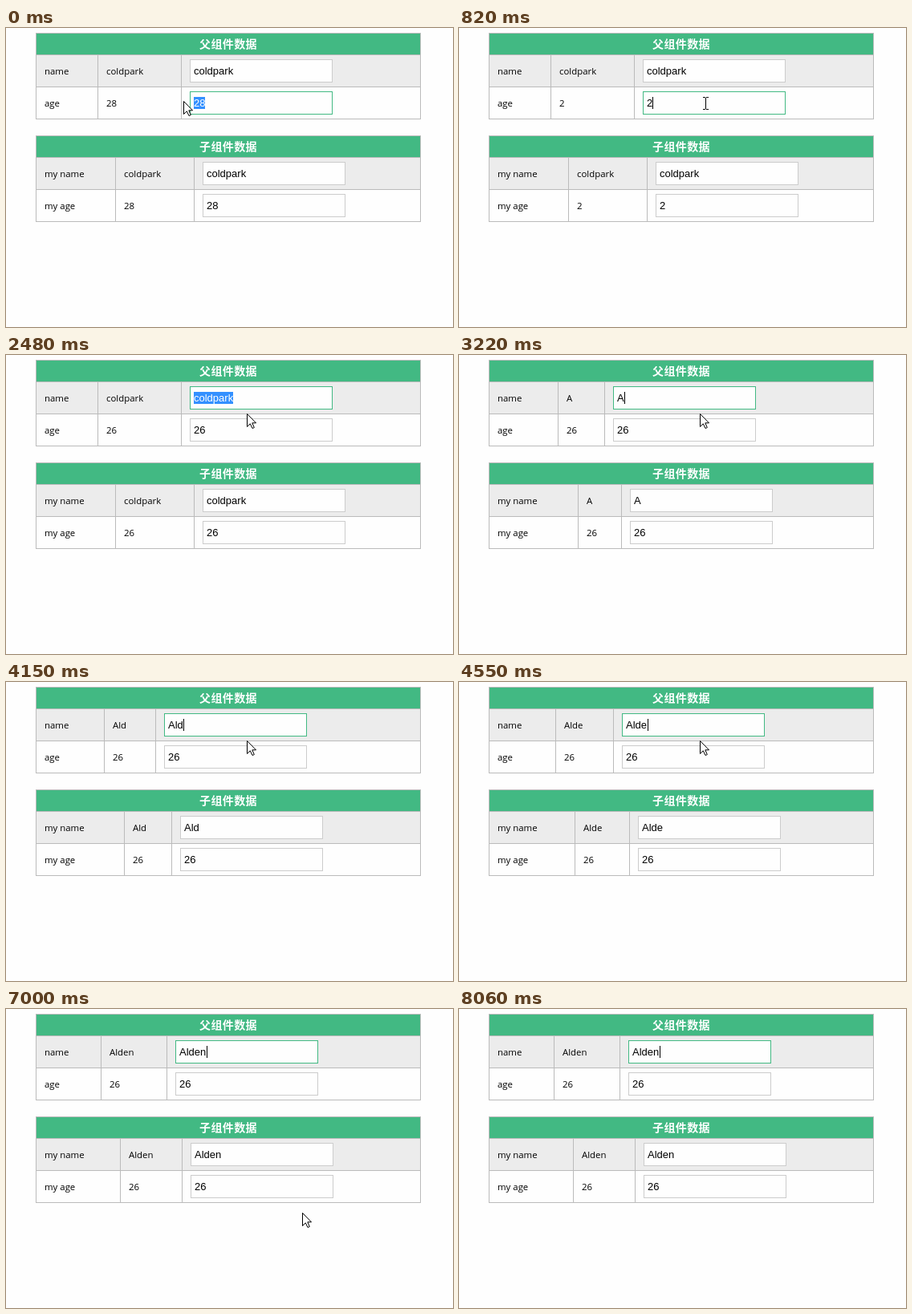
Recreate the animation shown at these times as an HTML page. Size 557 by 373 pixels, loop 8.16 s.

```html
<!DOCTYPE html>
<html lang="zh">
<head>
<meta charset="utf-8">
<style>
html, body { margin: 0; width: 100%; height: 100%; overflow: hidden; background: #fefefe; }
svg { display: block; }
text { white-space: pre; }
.cell { font: 11.4px "Open Sans", sans-serif; }
.field { font: 13px "Liberation Sans", Arial, sans-serif; }
.head { font: bold 14px "Noto Sans CJK SC", "Noto Sans CJK", sans-serif; letter-spacing: .4px; fill: #fff; }
</style>
</head>
<body>
<svg id="stage" width="557" height="373"></svg>
<script>
const LOOP = 8160, GREEN = '#42b983', LINE = '#bbb';

// Column dividers: parent 1, parent 2, child 1, child 2
const wide = [114, 218, 136, 234], narrow = [123, 181, 148, 202];

// Each step lists only what changes. sel: [first character, left, right] and
// caret are measured from the start of the focused field's text.
const arrow = (x, y) => ({ shape: 'arrow', x, y });
const beam = (x, y) => ({ shape: 'beam', x, y });
const steps = [
  [0, { name: 'coldpark', age: '28', cols: wide, focus: 'age', sel: [0, 0, 14], caret: null, mouse: arrow(221, 91) }],
  [160, { sel: [1, 7, 14], mouse: beam(239, 80) }],
  [300, { mouse: beam(242, 81) }],
  [420, { sel: null, caret: 14 }],
  [700, { age: '2', caret: 7 }],
  [820, { mouse: beam(304, 86) }],
  [970, { mouse: beam(320, 89), caret: null }],
  [1090, { mouse: beam(323, 90) }],
  [1340, { age: '26', caret: 14, mouse: beam(323, 89) }],
  [1500, { mouse: beam(320, 56) }],
  [1640, { mouse: beam(322, 53) }],
  [1760, { mouse: beam(322, 52), caret: null }],
  [1910, { focus: 'name', sel: [5, 31, 49], mouse: beam(260, 45) }],
  [2060, { sel: [0, 0, 49], mouse: beam(224, 44) }],
  [2210, { mouse: beam(222, 45) }],
  [2340, { mouse: beam(230, 47) }],
  [2480, { mouse: arrow(300, 73) }],
  [3220, { name: 'A', cols: narrow, sel: null, caret: 9 }],
  [3620, { name: 'Al', caret: 12 }],
  [4150, { name: 'Ald', cols: [122, 186, 147, 206], caret: 19 }],
  [4550, { name: 'Alde', cols: [120, 192, 144, 212], caret: 27 }],
  [4950, { name: 'Alden', cols: [118, 200, 142, 219], caret: 34 }],
  [5450, { caret: null }],
  [6010, { caret: 34 }],
  [6570, { caret: null }],
  [6720, { mouse: arrow(335, 150) }],
  [6850, { mouse: arrow(370, 247) }],
  [7000, { mouse: arrow(369, 254), caret: 34 }],
  [7150, { mouse: arrow(405, 305) }],
  [7270, { mouse: arrow(460, 358) }],
  [7410, { mouse: null }],
  [7530, { caret: null }],
  [8060, { caret: 34 }]
];

const rect = (x, y, w, h, fill) =>
  `<rect x="${x}" y="${y}" width="${w}" height="${h}" fill="${fill}"/>`;
const text = (x, y, cls, s) => `<text x="${x}" y="${y}" class="${cls}">${s}</text>`;

function field(x, y, value, focused, s) {
  const sel = focused && s.sel, from = sel ? sel[0] : value.length;
  let out = rect(x, y, 178, 29, focused ? GREEN : '#ccc') + rect(x + 1, y + 1, 176, 27, '#fefefe');
  if (sel) out += rect(x + 5 + sel[1], y + 7, sel[2] - sel[1], 15, '#3390ff');
  out += text(x + 5, y + 19, 'field',
    `${value.slice(0, from)}<tspan fill="#fff">${value.slice(from)}</tspan>`);
  if (focused && s.caret !== null) out += rect(x + 5 + s.caret, y + 7, 1, 15, '#000');
  return out;
}

function table(top, title, prefix, [a, b], s, active) {
  let out = rect(37, top, 480, 108, LINE) + rect(38, top + 1, 478, 26, GREEN) +
    text(241, top + 19, 'head', title);
  ['name', 'age'].forEach((key, i) => {
    const y = top + 28 + i * 40;
    out += rect(38, y, 478, 39, i ? '#fefefe' : '#ececec') +
      rect(a, y, 1, 39, LINE) + rect(b, y, 1, 39, LINE) +
      text(48, y + 24, 'cell', prefix + key) + text(a + 11, y + 24, 'cell', s[key]) +
      field(b + 11, y + 5, s[key], active && s.focus === key, s);
  });
  return out;
}

function pointer({ shape, x, y }) {
  const art = shape === 'arrow'
    ? '<path d="M.5 .5V16.5L4.3 12.8L7 18.5L9.3 17.5L6.8 11.8H11.5Z" fill="#fff" stroke="#000"/>'
    : '<path d="M0 .5H3M4 .5H7M3.5 1V15M0 15.5H3M4 15.5H7" fill="none" stroke="#000"/>';
  return `<g transform="translate(${x} ${y})">${art}</g>`;
}

const stage = document.getElementById('stage');
let shown = -1;

function draw() {
  const t = performance.now() % LOOP;
  const count = steps.filter(([at]) => at <= t).length;
  if (count !== shown) {
    shown = count;
    const s = Object.assign({}, ...steps.slice(0, count).map(step => step[1]));
    stage.innerHTML = table(6, '父组件数据', '', s.cols.slice(0, 2), s, true) +
      table(134, '子组件数据', 'my ', s.cols.slice(2), s, false) +
      (s.mouse ? pointer(s.mouse) : '');
  }
  requestAnimationFrame(draw);
}
draw();
</script>
</body>
</html>
```
